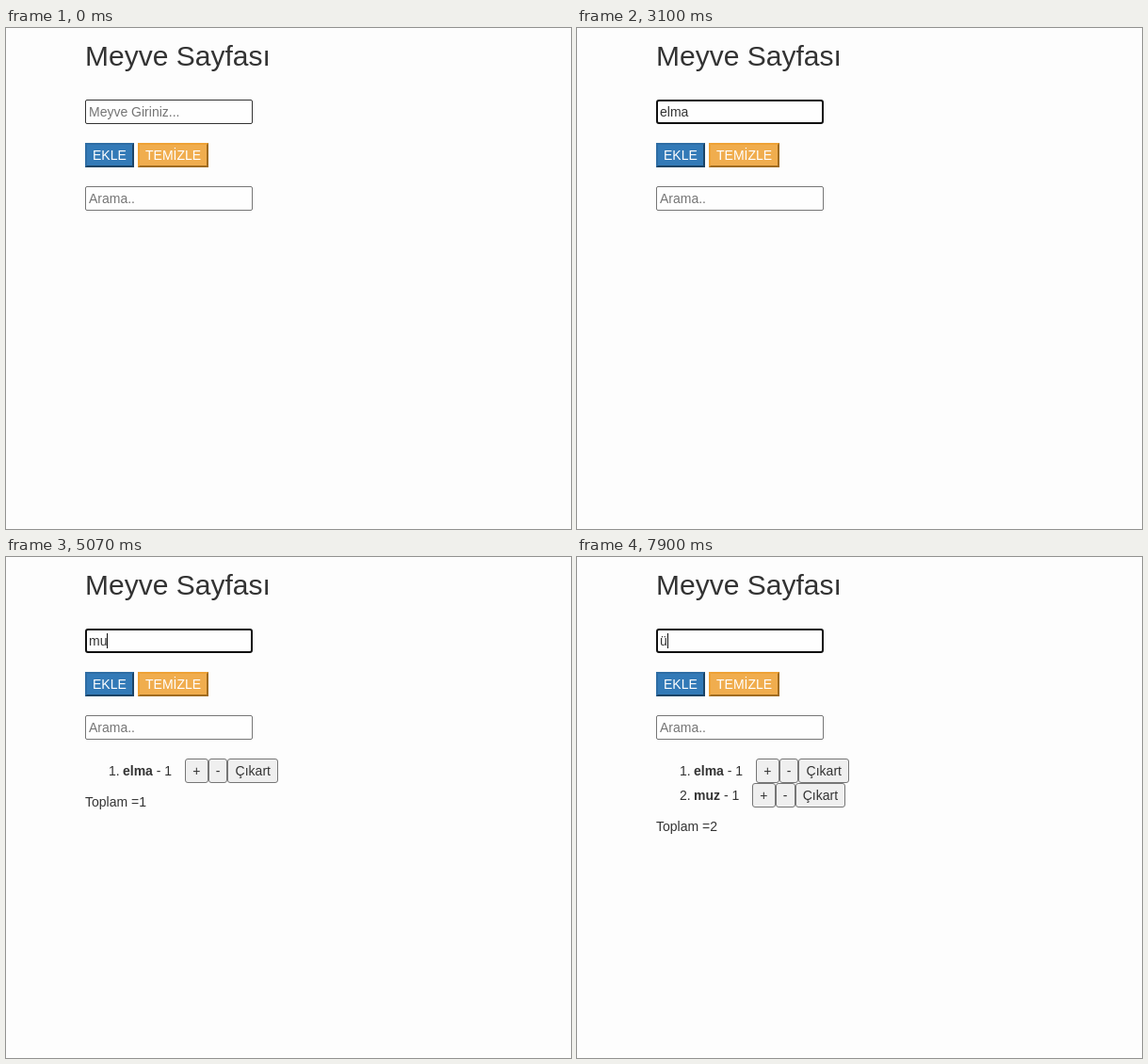
Recreate the animation shown at these times as an HTML page. Size 600 px wide and 532 px high, loop 8000 ms.

```html
<!DOCTYPE html>
<html lang="tr">
<head>
<meta charset="utf-8">
<title>Meyve Sayfası</title>
<style>
  html, body { margin: 0; width: 100%; height: 100%; overflow: hidden; background: #fdfdfd; }
  body { position: relative; font: 14px/26px "Liberation Sans", Arial, sans-serif; color: #333; }
  body > * { position: absolute; left: 84px; white-space: pre; }
  h2 { top: 13px; margin: 0; font-size: 30px; line-height: 33px; font-weight: 400; }
  .field {
    box-sizing: border-box; width: 178px; height: 26px; padding-left: 3px;
    border: 1px solid #767676; border-radius: 2px; line-height: 24px; background: #fefefe;
  }
  .field.active { border-color: #333; }
  .field.focus { border: 2px solid #101010; border-radius: 3px; padding-left: 2px; line-height: 22px; }
  .hint { color: #757575; }
  .caret { position: absolute; top: 3px; width: 1px; height: 16px; background: #111; }
  .main {
    box-sizing: border-box; top: 122px; height: 26px; padding: 0 6px; line-height: 22px;
    border: 2px solid; color: #fff;
  }
  #add { background: #337ab7; border-color: #2e6da4 #1c4466 #1c4466 #2e6da4; }
  #add.hover { background: #286090; border-color: #204d74 #0e2030 #0e2030 #204d74; }
  #add.down { background: #204d74; border-color: #0e2030 #122b40 #122b40 #0e2030; }
  #clear { left: 140px; background: #f0ad4e; border-color: #eea236 #a06c20 #a06c20 #eea236; }
  .row { left: 109px; height: 26px; }
  .count { position: absolute; left: 15px; top: 0; }
  .small {
    display: inline-block; box-sizing: border-box; height: 26px; padding: 0 7.15px; line-height: 24px;
    border: 1px solid #767676; border-radius: 3px; background: #efefef; vertical-align: top;
  }
  .small:first-of-type { margin-left: 10px; }
</style>
</head>
<body>
<h2>Meyve Sayfası</h2>
<div class="field" id="entry" style="top:76px"><span id="text"></span><i class="caret" id="caret"></i></div>
<div class="main" id="add">EKLE</div>
<div class="main" id="clear">TEMİZLE</div>
<div class="field hint" style="top:168px">Arama..</div>
<div id="total"></div>
<script>
const LOOP = 8000, BLINK = 515;
const $ = id => document.getElementById(id);

// Each track is a list of [start time, value].
const typed = [
  [0, ''], [770, 'e'], [1030, 'el'], [1270, 'elm'], [1500, 'elma'], [3470, ''],
  [4830, 'm'], [5070, 'mu'], [5330, 'muz'], [6700, ''], [7870, 'ü']
];
const focus = [[0, false], [70, true], [3370, false], [4100, true], [6600, false], [7170, true]];
const button = [
  [0, ''], [3170, 'hover'], [3370, 'down'], [3470, 'hover'], [4100, ''],
  [6500, 'hover'], [6600, 'down'], [6700, 'hover'], [7170, '']
];
const added = [[0, 0], [3470, 1], [6700, 2]];
const at = (track, t) => track.findLast(([start]) => start <= t);

const rows = ['elma', 'muz'].map((name, i) => {
  const row = document.createElement('div');
  row.className = 'row';
  row.style.top = 214 + 26 * i + 'px';
  row.innerHTML = `${i + 1}.<div class="count"><b>${name}</b> - 1 ` +
    ['+', '-', 'Çıkart'].map(label => `<span class="small">${label}</span>`).join('') + '</div>';
  document.body.append(row);
  return row;
});

function draw(t) {
  const [typedAt, value] = at(typed, t), [focusAt, focused] = at(focus, t), [, count] = at(added, t);
  $('entry').className = 'field' + (focused ? ' focus' : t < 70 ? ' active' : '');
  $('text').textContent = value || 'Meyve Giriniz...';
  $('text').className = value ? '' : 'hint';

  const blink = Math.floor((t - Math.max(typedAt, focusAt)) / BLINK);
  $('caret').style.display = focused && blink % 2 === 0 ? '' : 'none';
  $('caret').style.left = (value ? Math.floor(2 + $('text').offsetWidth) : 2) + 'px';

  $('add').className = 'main ' + at(button, t)[1];
  rows.forEach((row, i) => row.style.display = i < count ? '' : 'none');
  $('total').textContent = count ? 'Toplam =' + count : '';
  $('total').style.top = 221 + 26 * count + 'px';
}

const start = performance.now();
function frame() {
  draw((performance.now() - start) % LOOP);
  requestAnimationFrame(frame);
}
draw(0);
requestAnimationFrame(frame);
</script>
</body>
</html>
```
